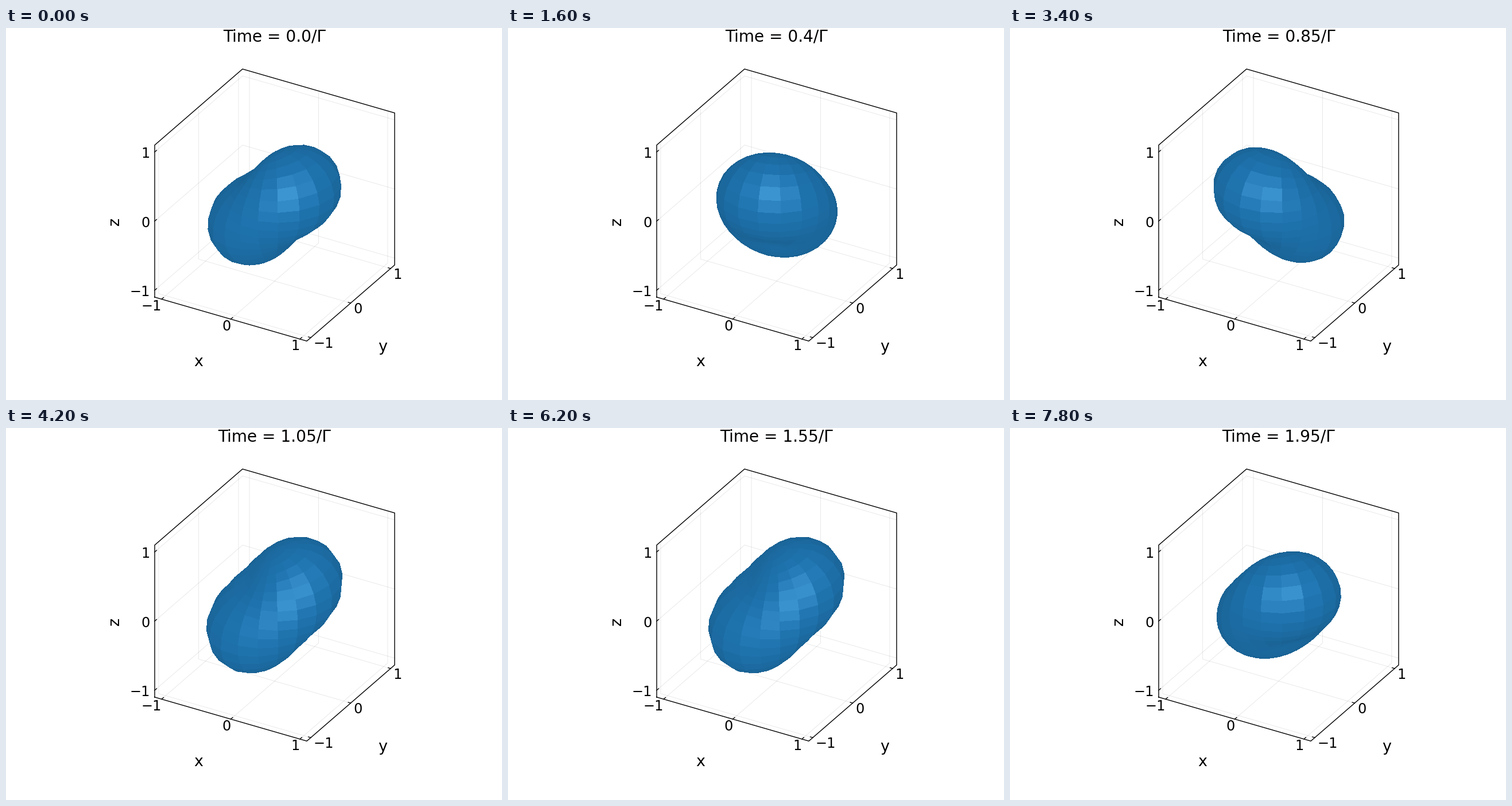
These frames come from a looping animation (864 by 648 pixels, 8000 ms). A matplotlib script:

```python
import numpy as np
import matplotlib.pyplot as plt
from matplotlib.animation import FuncAnimation
from matplotlib.collections import PolyCollection

W, H = 864, 648
FRAMES, STEP_MS = 40, 200
CENTER = np.array([468.0, 308.4])
SCALE = 139.06
LIM = 1.1

# orthographic camera: azimuth -60 degrees, elevation 30 degrees
C, S = np.sqrt(3) / 2, 0.5
RIGHT = np.array([C, S, 0])
UP = np.array([-S * S, S * C, C])
VIEW = np.array([C * S, -C * C, S])

BASE = np.array([31, 119, 180]) / 255

plt.rcParams["font.family"] = "DejaVu Sans"
fig = plt.figure(figsize=(W / 72, H / 72), dpi=72, facecolor="white")
ax = fig.add_axes([0, 0, 1, 1])
ax.set_xlim(0, W)
ax.set_ylim(H, 0)
ax.axis("off")


def project(p):
    p = np.asarray(p, float)
    return CENTER + SCALE * np.stack([p @ RIGHT, -(p @ UP)], axis=-1)


def path(points, **style):
    xy = project(points)
    ax.plot(xy[:, 0], xy[:, 1], **style)


def tick(point, direction, length=4.5):
    a = project(point)
    d = project(direction) - CENTER
    b = a + d / np.hypot(*d) * length
    ax.plot([a[0], b[0]], [a[1], b[1]], color="black", lw=1.3, zorder=4)


def label(x, y, s, size=24, ha="center", rotation=0):
    ax.text(x, y, s, fontsize=size, ha=ha, va="center_baseline" if not rotation else "center",
            rotation=rotation, color="black", zorder=5)


def draw_box():
    grid = dict(color="black", alpha=0.085, lw=1, zorder=1)
    edge = dict(color="black", lw=1.4, zorder=4, solid_joinstyle="miter",
                solid_capstyle="projecting")
    for t in (-1, 0, 1):
        path([(t, -LIM, -LIM), (t, LIM, -LIM), (t, LIM, LIM)], **grid)
        path([(LIM, t, -LIM), (-LIM, t, -LIM), (-LIM, t, LIM)], **grid)
        path([(-LIM, -LIM, t), (-LIM, LIM, t), (LIM, LIM, t)], **grid)

    path([(-LIM, -LIM, -LIM), (LIM, -LIM, -LIM), (LIM, LIM, -LIM), (LIM, LIM, LIM),
          (-LIM, LIM, LIM), (-LIM, -LIM, LIM), (-LIM, -LIM, -LIM)], **edge)

    for t in (-1, 0, 1):
        text = str(t).replace("-", "\u2212")
        px, py, pz = (t, -LIM, -LIM), (LIM, t, -LIM), (-LIM, -LIM, t)
        tick(px, (0, 1, 0))
        tick(py, (-1, 0, 0))
        tick(pz, (0, 1, 0))
        x, y = project(px)
        label(x, y + 10, text, ha="right")
        x, y = project(py)
        label(x + 4.5, y + 8.3, text, ha="left")
        x, y = project(pz)
        label(x - 8, y + 1, text, ha="right")

    label(335.5, 579, "x", 27)
    label(656.5, 553, "y", 27)
    label(189.5, 336.5, "z", 27, rotation=90)


theta, phi = np.meshgrid(np.linspace(0, np.pi, 20), np.linspace(0, 2 * np.pi, 20),
                         indexing="ij")
SPHERE = np.stack([np.sin(theta) * np.cos(phi), np.sin(theta) * np.sin(phi),
                   np.cos(theta)], axis=-1)


def facets(turn):
    """Visible quads and their colours for a precession angle."""
    r = 0.75 + 0.25 * np.sin(2 * theta) * np.cos(phi - turn)
    p = r[..., None] * SPHERE
    quads = np.stack([p[:-1, :-1], p[1:, :-1], p[1:, 1:], p[:-1, 1:]], axis=2)
    quads = quads.reshape(-1, 4, 3)
    normal = np.cross(quads[:, 2] - quads[:, 0], quads[:, 3] - quads[:, 1])
    normal /= np.linalg.norm(normal, axis=1, keepdims=True)
    facing = normal @ VIEW
    order = np.argsort(quads.mean(axis=1) @ VIEW)
    order = order[facing[order] > 0]
    lit = facing[order, None]
    colors = BASE * (0.8 + 0.2 * lit) + 0.115 * lit ** 14
    return project(quads[order]), np.clip(colors, 0, 1)


draw_box()
surface = PolyCollection([], antialiaseds=False, linewidths=0, zorder=3)
ax.add_collection(surface, autolim=False)
title = ax.text(CENTER[0], 24, "", fontsize=28, ha="center", va="baseline", zorder=5)


def update(i):
    verts, colors = facets(2 * np.pi * i / 10)
    surface.set_verts(verts)
    surface.set_facecolor(colors)
    title.set_text(f"Time = {round(i * 0.05, 2)}/\u0393")
    return surface, title


anim = FuncAnimation(fig, update, frames=FRAMES, interval=STEP_MS, repeat=True,
                     repeat_delay=0, blit=False)
plt.show()
```
